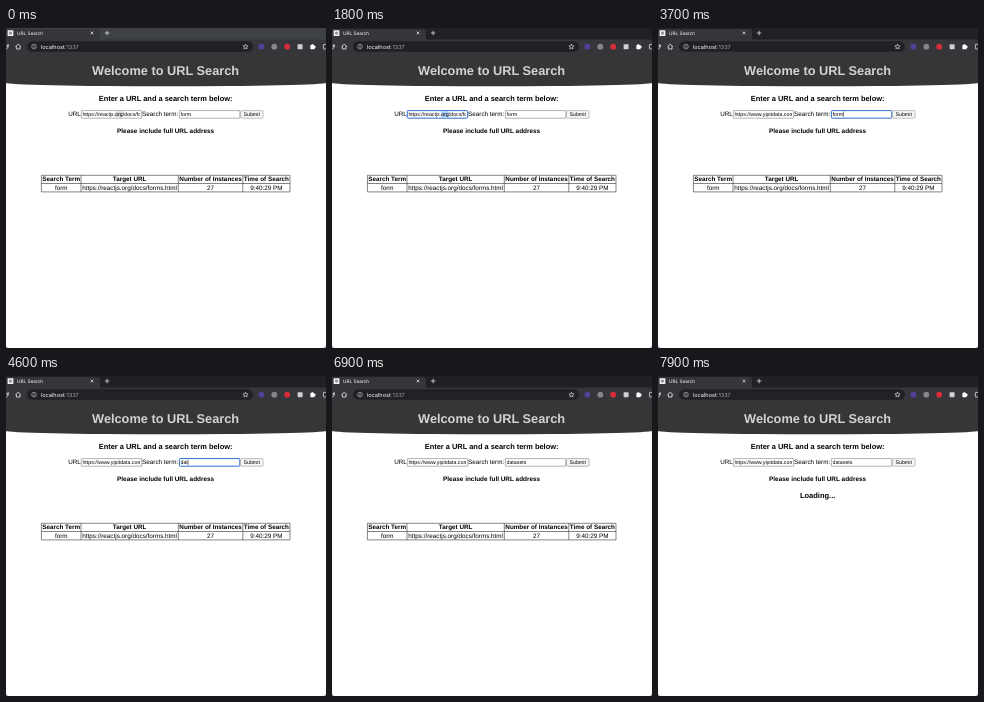
Recreate the animation shown at these times as an HTML page with a canvas. Size 320x320 px, loop 8 s.

```html
<!DOCTYPE html>
<html lang="en">
<head>
<meta charset="utf-8">
<title>URL Search</title>
<style>
html, body { margin: 0; width: 100%; height: 100%; overflow: hidden; background: #fff; }
canvas { display: block; width: 320px; height: 320px; }
</style>
</head>
<body>
<canvas id="stage"></canvas>
<script>
const LOOP = 8000;
const SANS = '"Liberation Sans", Arial, sans-serif';
const UI = 'Inter, Roboto, sans-serif';
const BODY = 6.32, FIELD = 5.27;
const SELECTED = '#accef7', SELECTED_IDLE = '#dadada';
const OLD_URL = 'https://reactjs.org/docs/forms.html';
const NEW_URL = 'https://www.yipitdata.com/';
const WORD = 'datasets';
const ACTIVATE = 1700;
const KEY_TIMES = [4300, 4500, 4600, 4700, 5000, 5100, 5300, 5600];

const canvas = document.getElementById('stage');
const ctx = canvas.getContext('2d');
const ratio = window.devicePixelRatio || 1;
canvas.width = canvas.height = 320 * ratio;
ctx.scale(ratio, ratio);
ctx.textRendering = 'geometricPrecision';

const between = (t, a, b) => t >= a && t < b;

function rect(x, y, w, h, color) {
  ctx.fillStyle = color;
  ctx.fillRect(x, y, w, h);
}

function round(x, y, w, h, r, fill, stroke, weight = 0.5) {
  ctx.beginPath();
  ctx.roundRect(x, y, w, h, r);
  if (fill) { ctx.fillStyle = fill; ctx.fill(); }
  if (stroke) { ctx.strokeStyle = stroke; ctx.lineWidth = weight; ctx.stroke(); }
}

function dot(x, y, r, color) {
  ctx.beginPath();
  ctx.arc(x, y, r, 0, Math.PI * 2);
  ctx.fillStyle = color;
  ctx.fill();
}

function line(color, weight, ...points) {
  ctx.beginPath();
  points.forEach(([x, y], i) => i ? ctx.lineTo(x, y) : ctx.moveTo(x, y));
  ctx.strokeStyle = color;
  ctx.lineWidth = weight;
  ctx.stroke();
}

function setFont(size, bold, family = SANS) {
  ctx.font = `${bold ? 'bold ' : ''}${size}px ${family}`;
}

function text(str, x, y, size, { bold, color = '#000', align = 'left', family } = {}) {
  setFont(size, bold, family);
  ctx.textAlign = align;
  ctx.fillStyle = color;
  ctx.fillText(str, x, y);
}

function centered(str, x, y, size, bold, color) {
  text(str, x, y, size, { bold, color, align: 'center' });
}

function drawTabs(active) {
  const ink = '#f0f0f2';
  rect(0, 0, 320, 12, active ? '#202124' : '#3f4245');
  round(-4, 1, 98, 14, 3, '#35363a');
  round(1.6, 2.2, 5.8, 5.8, 0.6, '#f1f1f3');
  dot(4.5, 5.1, 1.6, '#8b8f98');
  text('URL Search', 11, 6.9, 4.7, { color: '#fff', family: UI });
  line(ink, 0.7, [84.6, 3.6], [87.4, 6.4]);
  line(ink, 0.7, [87.4, 3.6], [84.6, 6.4]);
  line(ink, 0.7, [98.8, 5], [103.4, 5]);
  line(ink, 0.7, [101.1, 2.7], [101.1, 7.3]);
}

function drawToolbar() {
  const ink = '#f0f0f2';
  rect(0, 11.5, 320, 14, '#35363a');

  ctx.beginPath();
  ctx.arc(0, 18.7, 2.1, -1, 2.6);
  ctx.strokeStyle = ink;
  ctx.lineWidth = 0.8;
  ctx.stroke();
  line(ink, 0.8, [2.2, 16.2], [2.2, 18], [0.4, 18]);
  line(ink, 0.8, [9.4, 18.8], [12.2, 16.2], [15, 18.8]);
  line(ink, 0.8, [10.4, 18.4], [10.4, 21], [14, 21], [14, 18.4]);

  round(21, 13.2, 226, 10.6, 5.3, '#202124');
  round(25.7, 16.3, 4.6, 4.6, 2.3, null, ink);
  line(ink, 0.6, [28, 18.3], [28, 20]);
  line(ink, 0.6, [28, 17.1], [28, 17.7]);
  setFont(5.6, false, UI);
  const hostWidth = ctx.measureText('localhost').width;
  text('localhost', 34.9, 20.6, 5.6, { color: '#fff', family: UI });
  text(':1337', 34.9 + hostWidth, 20.6, 5.6, { color: '#a5a7ac', family: UI });

  ctx.beginPath();
  for (let i = 0; i < 10; i++) {
    const a = i * Math.PI / 5 - Math.PI / 2, r = i % 2 ? 1.2 : 2.7;
    ctx.lineTo(239.5 + r * Math.cos(a), 18.8 + r * Math.sin(a));
  }
  ctx.closePath();
  ctx.strokeStyle = ink;
  ctx.lineWidth = 0.6;
  ctx.stroke();

  dot(255.4, 18.7, 2.9, '#54409a');
  dot(268.3, 18.7, 2.9, '#85868c');
  dot(281.2, 18.7, 2.9, '#d92c3a');
  round(291.6, 16.2, 5, 5, 0.6, '#d0d0d2');
  round(304.4, 17, 4.2, 4.2, 0.5, '#fff');
  dot(306.3, 16.8, 0.9, '#fff');
  dot(308.8, 19, 0.9, '#fff');
  round(317.4, 16.4, 4, 4.6, 0.5, null, ink, 0.7);
}

function drawBanner() {
  ctx.beginPath();
  ctx.moveTo(0, 25);
  ctx.lineTo(320, 25);
  ctx.lineTo(320, 55);
  ctx.ellipse(160, 55, 160, 3.2, 0, 0, Math.PI);
  ctx.closePath();
  ctx.fillStyle = '#363636';
  ctx.fill();
  centered('Welcome to URL Search', 159.6, 46.5, 12.78, true, '#d3d3d3');
}

// sel is [start, end, color]; with scroll the view follows the end of the value.
function drawInput(x, value, { focus, sel, caret, scroll } = {}) {
  const y = 82.6, w = 60.4, h = 7.6, pad = 1.1;
  round(x, y, w, h, focus ? 0.8 : 0.2, '#fff', focus ? '#2f6fd0' : '#808080', focus ? 1 : 0.6);
  ctx.save();
  ctx.beginPath();
  ctx.rect(x + pad, y + 0.4, w - 2.5 * pad, h - 0.8);
  ctx.clip();
  setFont(FIELD);
  const width = n => ctx.measureText(value.slice(0, n)).width;
  const total = width(value.length);
  const left = x + pad - (scroll ? Math.max(0, total - w + 2.5 * pad + 0.4) : 0);
  if (sel) {
    const [a, b, color] = sel;
    rect(left + width(a), y + 0.7, width(b) - width(a), h - 1.4, color);
  }
  text(value, left, 88.1, FIELD);
  if (caret) rect(left + total, y + 1, 0.45, h - 2, '#000');
  ctx.restore();
}

function drawForm(t) {
  centered('Enter a URL and a search term below:', 159.6, 72.8, 7.44, true);
  text('URL', 62.2, 88, BODY);
  text('Search term:', 136.1, 88, BODY);

  if (t < 2100) {
    const start = OLD_URL.indexOf('org');
    const focus = t >= ACTIVATE;
    const color = focus ? SELECTED : SELECTED_IDLE;
    const sel = t < 1900 ? [start, start + 3, color] : [0, OLD_URL.length, color];
    drawInput(75.3, OLD_URL, { focus, sel });
  } else {
    const focus = t < 3700;
    const caret = focus && !between(t, 3300, 3400);
    drawInput(75.3, t < 2800 ? '' : NEW_URL, { focus, caret, scroll: focus });
  }

  const typed = KEY_TIMES.filter(k => t >= k).length;
  const picked = between(t, 4000, 4300);
  const focus = between(t, 3700, 6600);
  drawInput(173.4, typed ? WORD.slice(0, typed) : 'form', {
    focus,
    caret: focus && !picked && t < 6100,
    sel: picked && [0, 4, SELECTED]
  });

  const hover = between(t, 6300, 7900);
  const pressed = between(t, 6600, 6800);
  round(234.6, 82.6, 22.4, 7.6, 1, pressed ? '#e4e4e4' : '#f7f7f7', hover ? '#686868' : '#808080');
  centered('Submit', 245.7, 88.1, FIELD);
  centered('Please include full URL address', 159.6, 104.5, 6.42, true);
}

function drawTable() {
  const edges = [35.4, 75, 172.3, 236.8, 284];
  const rows = [147.3, 155.5, 163.9];
  const heads = ['Search Term', 'Target URL', 'Number of Instances', 'Time of Search'];
  const cells = ['form', OLD_URL, '27', '9:40:29 PM'];
  edges.forEach(x => line('#333', 0.6, [x, rows[0]], [x, rows[2]]));
  rows.forEach(y => line('#333', 0.6, [edges[0], y], [edges[4], y]));
  heads.forEach((head, i) => {
    const mid = (edges[i] + edges[i + 1]) / 2;
    centered(head, mid, 153.2, BODY, true);
    centered(cells[i], mid, 161.5, BODY);
  });
}

function drawCorners() {
  ctx.save();
  ctx.beginPath();
  ctx.rect(0, 310, 320, 10);
  ctx.roundRect(0, 300, 320, 20, [0, 0, 3, 3]);
  ctx.clip('evenodd');
  rect(0, 316, 320, 4, '#777');
  ctx.restore();
}

function draw(t) {
  rect(0, 0, 320, 320, '#fff');
  drawTabs(t >= ACTIVATE);
  drawToolbar();
  drawBanner();
  drawForm(t);
  if (t < 7000) drawTable();
  else centered('Loading...', 159.6, 121.6, 7.5, true);
  drawCorners();
}

let begin = null;
function tick(now) {
  if (begin === null) begin = now;
  draw((now - begin) % LOOP);
  requestAnimationFrame(tick);
}
draw(0);
requestAnimationFrame(tick);
</script>
</body>
</html>
```
